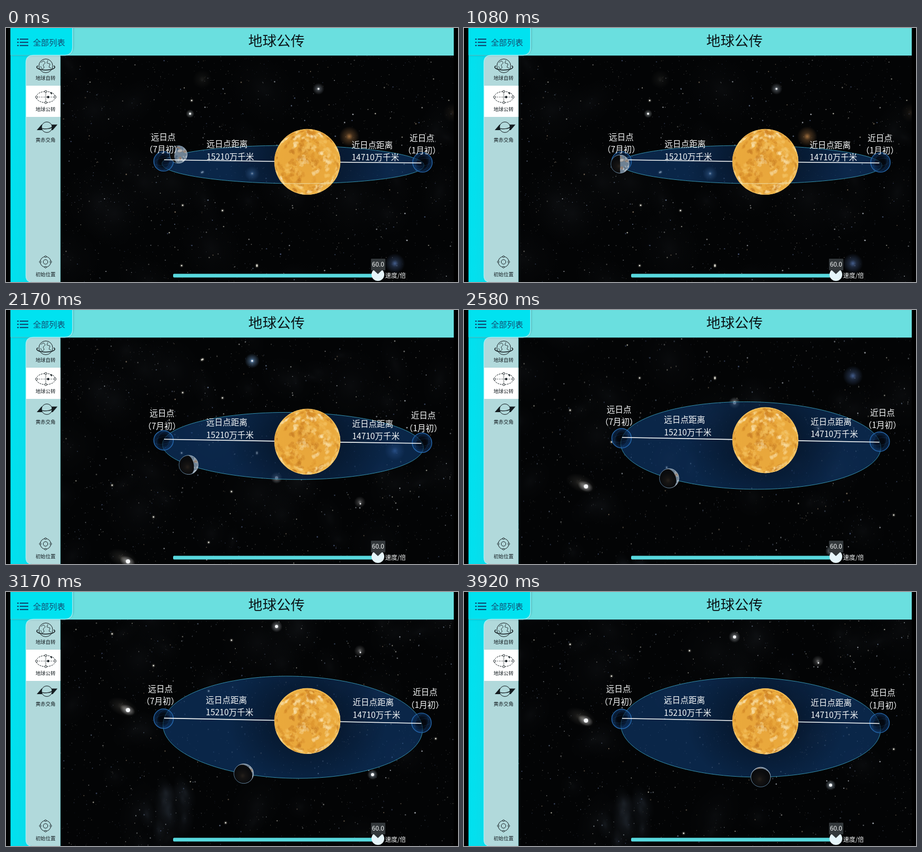
Animation of 852x480 px, one loop 4.01 s. Source, as an HTML page with a canvas:

```html
<!DOCTYPE html>
<html lang="zh">
<head>
<meta charset="utf-8">
<title>地球公传</title>
<style>
html, body { margin: 0; width: 100%; height: 100%; overflow: hidden; background: #000; }
canvas { display: block; }
</style>
</head>
<body>
<canvas id="stage" width="852" height="480"></canvas>
<script>
const W = 852, H = 480, LOOP = 4010, FPS = 12, TAU = Math.PI * 2;
const FONT = '"Noto Sans CJK SC", "Noto Sans CJK", sans-serif';
const INK = '#141c20', PANEL = '#b1d9db', WHITE = '#f8fafa';
const stage = document.getElementById('stage').getContext('2d');
let g = stage;

// Keys are [ms, value]
const TILT = [[0, 36], [1400, 36], [2170, 63.5], [2580, 82.5], [3170, 96.5], [3500, 98.5], [3920, 94]];
const ANGLE = [[0, -29], [1080, 1], [2170, 37], [2580, 51], [3170, 67.9], [3500, 81.2], [3920, 94.5]];

// Monotone cubic interpolation
function track(keys, t) {
  const last = keys.length - 2;
  let i = 0;
  while (i < last && t > keys[i + 1][0]) i++;
  const slope = k => (keys[k + 1][1] - keys[k][1]) / (keys[k + 1][0] - keys[k][0]);
  const tangent = k => {
    if (k === 0) return slope(0);
    if (k > last) return slope(last);
    const a = slope(k - 1), b = slope(k);
    return a * b <= 0 ? 0 : 2 * a * b / (a + b);
  };
  const [t0, v0] = keys[i], [t1, v1] = keys[i + 1];
  const h = t1 - t0, u = Math.min(1, (t - t0) / h), u2 = u * u, u3 = u2 * u;
  return v0 * (2 * u3 - 3 * u2 + 1) + v1 * (3 * u2 - 2 * u3)
    + h * (tangent(i) * (u3 - 2 * u2 + u) + tangent(i + 1) * (u3 - u2));
}

function random(seed) {
  return () => {
    seed = (seed + 0x6D2B79F5) | 0;
    let r = Math.imul(seed ^ (seed >>> 15), 1 | seed);
    r = (r + Math.imul(r ^ (r >>> 7), 61 | r)) ^ r;
    return ((r ^ (r >>> 14)) >>> 0) / 4294967296;
  };
}

function oval(x, y, rx, ry = rx, turn = 0) {
  g.beginPath();
  g.ellipse(x, y, rx, ry, turn, 0, TAU);
}
function fill(color) { g.fillStyle = color; g.fill(); }
function stroke(color, width = 1) { g.strokeStyle = color; g.lineWidth = width; g.stroke(); }
function rect(x, y, w, h, color) { g.fillStyle = color; g.fillRect(x, y, w, h); }
function poly(...pts) {
  g.beginPath();
  pts.forEach(([x, y]) => g.lineTo(x, y));
}
function text(str, x, y, size, color, align = 'center') {
  g.font = `${size}px ${FONT}`;
  g.textAlign = align;
  g.fillStyle = color;
  g.fillText(str, x, y + size * 0.37);
}
function glow(x, y, r, rgb, alpha, squash = 1, turn = 0) {
  g.save();
  g.translate(x, y);
  g.rotate(turn);
  g.scale(1, squash);
  const grad = g.createRadialGradient(0, 0, 0, 0, 0, r);
  grad.addColorStop(0, `rgba(${rgb},${alpha})`);
  grad.addColorStop(0.35, `rgba(${rgb},${alpha * 0.4})`);
  grad.addColorStop(1, `rgba(${rgb},0)`);
  oval(0, 0, r);
  fill(grad);
  g.restore();
}
function layer(w, h, paint) {
  const c = document.createElement('canvas');
  c.width = w;
  c.height = h;
  const before = g;
  g = c.getContext('2d');
  paint();
  g = before;
  return c;
}

const sky = layer(W, 940, () => {
  const rnd = random(41), tints = ['#8f8f8c', '#6c7a92', '#b5b3a6', '#56658a', '#8a7a66', '#c6ccd4'];
  rect(0, 0, W, 940, '#030405');
  for (let i = 0; i < 60; i++) {
    glow(102 + rnd() * 742, 60 + rnd() * 880, 25 + rnd() * 55, '50,55,62', 0.14, 0.4 + rnd() * 0.6, rnd() * 3);
  }
  for (let i = 0; i < 9; i++) {
    glow(250 + rnd() * 90, 800 + rnd() * 90, 20 + rnd() * 30, '55,65,78', 0.3, 0.5, 1 + rnd());
  }
  glow(370, 97, 18, '70,70,65', 0.35);
  glow(842, 160, 18, '80,65,50', 0.4);
  for (let i = 0; i < 3600; i++) {
    const x = 102 + rnd() * 742, y = 50 + rnd() * 890, size = 0.45 + rnd() ** 7 * 0.95;
    g.globalAlpha = 0.3 + rnd() * 0.6;
    oval(x, y, size);
    fill(tints[Math.floor(rnd() * tints.length)]);
  }
  g.globalAlpha = 1;
  [[350, 137], [371, 272], [408, 345], [333, 335], [200, 510], [278, 570], [425, 522], [382, 618],
   [414, 867], [331, 449], [810, 708], [473, 448], [369, 273], [473, 450]].forEach(([x, y]) => {
    glow(x, y, 4, '215,210,195', 0.7);
    oval(x, y, 1.3);
    fill('#eceae0');
  });
  glow(589, 115, 11, '160,170,180', 0.85);
  glow(647, 205, 19, '195,135,75', 0.8);
  glow(464, 275, 14, '130,180,235', 0.9);
  glow(733, 445, 19, '80,110,165', 0.85);
  glow(510, 496, 11, '215,220,225', 0.85);
  glow(667, 542, 11, '150,150,150', 0.75);
  glow(220, 648, 30, '120,115,105', 0.45, 0.55, 0.4);
  glow(229, 654, 15, '235,235,235', 1, 0.65, 0.4);
  glow(691, 776, 10, '205,225,240', 0.9);
  glow(347, 162, 8, '205,215,215', 0.85);
  [[464, 275, 1.8], [510, 496, 3], [230, 654, 4], [691, 776, 3], [347, 162, 2], [589, 115, 1.8], [668, 545, 1.5]]
    .forEach(([x, y, r]) => { oval(x, y, r); fill('#f6f8fa'); });
});

// Grainy filaments wandering over the sphere
const spots = (() => {
  const rnd = random(9), list = [];
  const tints = ['#f6d48c', '#f9e2ae', '#cf8426', '#d98f2a', '#f2c060', '#c47a22'];
  for (let i = 0; i < 130; i++) {
    let lat = Math.asin(rnd() * 2 - 1), lon = (rnd() - 0.5) * Math.PI;
    const color = tints[Math.floor(rnd() * tints.length)];
    for (let k = 0; k < 13; k++) {
      list.push({ lat, lon, color, r: 0.8 + rnd() * 2.8, alpha: 0.15 + rnd() * 0.3 });
      lat += (rnd() - 0.5) * 0.16;
      lon += (rnd() - 0.5) * 0.16;
    }
  }
  return list;
})();

function drawSun(x, y, pitch) {
  const R = 62.3;
  g.save();
  oval(x, y, R);
  g.clip();
  const body = g.createRadialGradient(x, y, 0, x, y, R);
  body.addColorStop(0, '#e8a63c');
  body.addColorStop(0.85, '#eaa93c');
  body.addColorStop(1, '#eeb348');
  fill(body);
  const c = Math.cos(pitch), s = Math.sin(pitch);
  spots.forEach(({ lat, lon, color, r, alpha }) => {
    const px = Math.cos(lat) * Math.sin(lon), y0 = -Math.sin(lat), z0 = Math.cos(lat) * Math.cos(lon);
    const py = y0 * c + z0 * s, pz = z0 * c - y0 * s;
    if (pz < 0) return;
    g.globalAlpha = alpha;
    oval(x + px * R, y + py * R, r * (0.35 + 0.65 * pz), r, Math.atan2(py, px));
    fill(color);
  });
  g.globalAlpha = 1;
  oval(x, y, R - 0.6);
  stroke('rgba(248,205,110,.7)', 1.4);
  g.restore();
}

function drawGhost(x, y) {
  const grad = g.createRadialGradient(x, y, 8, x, y, 19);
  grad.addColorStop(0, 'rgba(3,10,22,.6)');
  grad.addColorStop(1, 'rgba(16,62,120,.6)');
  oval(x, y, 18.5);
  fill(grad);
  stroke('#2a70b8', 1.2);
  oval(x, y, 12, 18, 0.4);
  stroke('rgba(45,110,180,.3)', 0.8);
  oval(x, y, 18, 7, -0.2);
  stroke('rgba(45,110,180,.25)', 0.8);
}

function drawEarth(x, y, r, terminator, dir) {
  g.save();
  g.translate(x, y);
  oval(0, 0, r);
  fill('#0a0b0d');
  g.save();
  g.clip();
  glow(-2, 4, r * 0.8, '80,65,50', 0.4);
  g.rotate(dir);
  g.beginPath();
  g.arc(0, 0, r, -Math.PI / 2, Math.PI / 2);
  g.ellipse(0, 0, Math.abs(terminator) * r, r, 0, Math.PI / 2, -Math.PI / 2, terminator > 0);
  g.clip();
  g.rotate(-dir);
  rect(-r, -r, r * 2, r * 2, '#6f8294');
  const rnd = random(5), tints = ['#cdd2d6', '#9a7c66', '#46607a', '#adb4ba', '#826e5a'];
  for (let i = 0; i < 34; i++) {
    oval((rnd() * 2 - 1) * r, (rnd() * 2 - 1) * r, 1 + rnd() * 4, 1 + rnd() * 2, rnd() * 3);
    g.globalAlpha = 0.65;
    fill(tints[i % 5]);
  }
  g.restore();
  const dx = Math.cos(dir) * r, dy = Math.sin(dir) * r;
  const rim = g.createLinearGradient(dx, dy, -dx, -dy);
  rim.addColorStop(0, 'rgba(190,205,220,.95)');
  rim.addColorStop(1, 'rgba(105,150,185,.75)');
  oval(0, 0, r);
  stroke(rim, 1);
  g.restore();
}

function drawSpace(t) {
  const b = track(TILT, t), d = b - 36;
  const phi = track(ANGLE, t) * Math.PI / 180;
  const cx = 541 - d * 0.008, cy = 258 - d * 0.04, a = 247 - d * 0.04, skew = b * 0.045;
  const onOrbit = p => [cx - a * Math.cos(p), cy + b * Math.sin(p) - skew * Math.cos(p)];
  const arc = (from, to) => {
    g.beginPath();
    for (let i = 0; i <= 120; i++) g.lineTo(...onOrbit(from + (to - from) * i / 120));
  };
  const sunX = 568, sunY = 253 - d * 0.152;
  const pitch = Math.asin(b / a);

  g.drawImage(sky, 0, -d * (6.05 + 0.0178 * d));

  arc(0, TAU);
  fill('rgba(18,66,128,.55)');
  g.save();
  g.clip();
  glow(sunX, sunY, 150, '0,3,8', 1, 0.85);
  g.restore();
  arc(0, TAU);
  stroke('#3590ac', 1);

  const [ex, ey] = onOrbit(phi);
  const earth = () => drawEarth(ex, ey, 17.2 + 1.4 * Math.sin(phi),
    Math.sin(phi) * Math.cos(pitch) * 0.94, Math.atan2(sunY - ey, sunX - ex));

  drawGhost(297, 252 - d * 0.208);
  drawGhost(785 - d * 0.03, 254 - d * 0.112);
  if (phi < 0) earth();
  poly([298, 249 - d * 0.176], [sunX, sunY], [783, 255 - d * 0.112]);
  stroke(WHITE, 1.6);
  drawSun(sunX, sunY, pitch);

  g.save();
  oval(sunX, sunY, 62);
  g.clip();
  arc(0.2, Math.PI - 0.2);
  stroke('rgba(240,240,200,.8)', 1);
  g.restore();
  if (phi >= 0) earth();

  const label = (str, x, y, dx, dy, align) =>
    text(str, x + d * dx, y + d * dy, 15.5, WHITE, align);
  label('远日点', 296.5, 206, -0.09, -0.384);
  label('（7月初）', 296.5, 229.5, -0.09, -0.384);
  label('近日点', 784, 208, 0.1, -0.304);
  label('（1月初）', 784, 231.5, 0.1, -0.304);
  label('远日点距离', 378, 219.5, -0.02, -0.256, 'left');
  label('15210万千米', 378, 243, -0.02, -0.256, 'left');
  label('近日点距离', 651.5, 221, 0.035, -0.21, 'left');
  label('14710万千米', 651.5, 244.5, 0.035, -0.21, 'left');
}

function drawIcons() {
  // Globe with ring
  oval(75, 71.5, 13);
  stroke(INK, 1);
  poly([66, 65], [71, 62], [74, 66], [70, 70], [72, 75], [68, 78], [65, 72]);
  stroke(INK, 0.8);
  poly([79, 61], [77, 66], [83, 68], [81, 74], [85, 76]);
  stroke(INK, 0.8);
  g.beginPath();
  g.ellipse(75, 74, 17, 5.5, 0, -0.5, Math.PI + 0.5);
  stroke(INK, 1.6);
  // Orbit
  oval(75, 130.5, 18, 10.5);
  g.setLineDash([3, 1.5]);
  stroke(INK, 1);
  poly([57, 130.5], [93, 130.5]);
  stroke(INK, 0.6);
  g.setLineDash([]);
  poly([75, 120], [75, 141]);
  stroke(INK, 0.6);
  [[57.5, 130.5], [92.5, 130.5], [75, 120], [75, 141]].forEach(([x, y]) => {
    oval(x, y, 2);
    fill('#fff');
    stroke(INK, 0.9);
  });
  oval(79.5, 130.5, 2.2);
  fill(INK);
  poly([83, 122], [87, 122], [86, 126]);
  fill(INK);
  // Inclined plane, passing in front of the planet's lower half
  poly([58, 193], [67, 182.5], [97, 182.5], [88, 193]);
  fill(INK);
  oval(77, 187.5, 10);
  fill(PANEL);
  stroke(INK, 1);
  g.beginPath();
  g.ellipse(77, 187.5, 10, 3, -0.1, 0, Math.PI);
  stroke(INK, 1.2);
  // Reset
  oval(74.5, 442, 10);
  stroke(INK, 1);
  oval(74.5, 442, 4.3);
  stroke(INK, 1);
  for (let i = 0; i < 4; i++) {
    const q = i * TAU / 4;
    oval(74.5 + 10 * Math.cos(q), 442 + 10 * Math.sin(q), 1.6);
    fill(PANEL);
    stroke(INK, 0.9);
  }
}

const frame = layer(W, H, () => {
  const edge = '#a2f2f6';
  rect(0, 0, 8.5, H, '#000');
  rect(844, 0, 8, H, '#000');
  rect(8.5, 0, 835.5, 52, '#6adfdf');
  const side = g.createLinearGradient(8, 0, 38, 0);
  side.addColorStop(0, '#00e2f0');
  side.addColorStop(1, '#08dcea');
  rect(8.5, 52, 94, 428, side);
  g.save();
  g.beginPath();
  g.roundRect(37, 52, 80, 428, [14, 0, 0, 12]);
  g.clip();
  rect(37, 52, 65.5, 428, PANEL);
  rect(37, 109, 65.5, 59, '#fff');
  g.restore();
  g.clearRect(102.5, 52, 24, 428);
  rect(102.5, 52, 741.5, 2, 'rgba(20,45,50,.5)');

  g.beginPath();
  g.roundRect(8.5, -20, 117.5, 71, [0, 0, 15, 0]);
  g.shadowColor = 'rgba(0,70,90,.5)';
  g.shadowBlur = 4;
  fill('#00e2f0');
  g.shadowBlur = 0;
  g.beginPath();
  g.moveTo(46, 480);
  g.quadraticCurveTo(37.5, 478, 37.5, 468);
  g.lineTo(37.5, 66);
  g.quadraticCurveTo(37.5, 51.5, 52, 51.5);
  g.lineTo(111, 51.5);
  g.quadraticCurveTo(125.5, 51, 125.5, 36);
  g.lineTo(125.5, 0);
  stroke(edge, 1.3);

  [21, 27, 33].forEach(y => {
    rect(21, y - 1, 3, 2.2, '#0f4a72');
    rect(26, y - 1, 16, 2.2, '#0f4a72');
  });
  text('全部列表', 81, 27, 15.2, '#124f74');
  text('地球公传', 510, 24.5, 26.6, '#0b1518');
  text('地球自转', 74.5, 95, 9.4, INK);
  text('地球公转', 74.5, 153.5, 9.4, INK);
  text('黄赤交角', 74.5, 212, 9.4, INK);
  text('初始位置', 74.5, 465.5, 9.4, INK);
  drawIcons();

  g.beginPath();
  g.roundRect(315, 464.5, 386, 7, 2);
  fill('#58d9de');
  oval(701, 466, 12);
  fill('#e6f5fa');
  g.beginPath();
  g.roundRect(688, 436, 27, 22, 1);
  fill('#33383b');
  poly([693, 457.5], [709, 457.5], [701, 465]);
  fill('#33383b');
  text('60.0', 701.3, 447, 11.8, WHITE);
  text('速度/倍', 714.5, 468, 11.6, WHITE, 'left');
});

const start = performance.now();
let shown = -1;
function render() {
  const t = (performance.now() - start) % LOOP;
  const step = Math.min(47, Math.floor((t + 3.4) * FPS / 1000));
  if (step !== shown) {
    shown = step;
    drawSpace(step * 1000 / FPS);
    stage.drawImage(frame, 0, 0);
  }
  requestAnimationFrame(render);
}
render();
</script>
</body>
</html>
```
